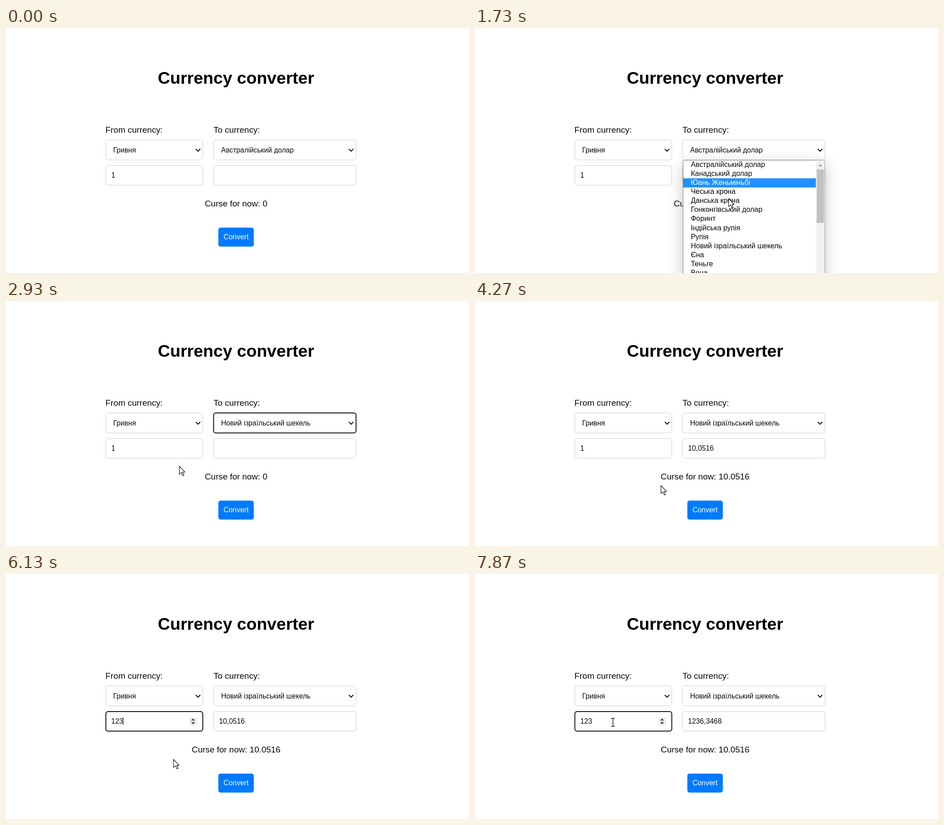
Animation of 1027 by 545 pixels, one loop 8000 ms. Source, as an HTML page:

```html
<!DOCTYPE html>
<html lang="en">
<head>
<meta charset="utf-8">
<title>Currency converter</title>
<style>
  html, body { margin: 0; width: 100%; height: 100%; overflow: hidden; background: #fff; }
  svg { display: block; font-family: "Liberation Sans", Arial, sans-serif; }
  text { white-space: pre; fill: #080808; }
  .label { font-size: 18.95px; }
  .choice { font-size: 15.65px; }
  .value { font-size: 15.8px; }
  .option { font-size: 16px; }
  .field { fill: #fff; stroke: #ccc; stroke-width: 1; }
  .field.focus { stroke: #101010; stroke-width: 2; }
  .chevron { fill: none; stroke: #111; stroke-width: 2; }
  #popup { filter: drop-shadow(0 10px 16px rgba(0, 0, 0, .22)); }
  .pointer { fill: #fff; stroke: #111; stroke-width: 1.2; stroke-linejoin: round; }
</style>
</head>
<body>
<svg id="stage" width="1027" height="545" viewBox="0 0 1027 545">
  <text x="510.2" y="123.8" text-anchor="middle" font-size="37.6" font-weight="700" style="fill:#000">Currency converter</text>
  <text class="label" x="220.5" y="232.6">From currency:</text>
  <text class="label" x="460.2" y="232.6">To currency:</text>

  <rect class="field" x="221.5" y="249" width="215" height="44.5" rx="5"/>
  <text class="choice" x="237.7" y="277">Гривня</text>
  <path class="chevron" d="M421 269l5 5 5-5"/>

  <rect class="field" id="target" x="460.5" y="249" width="316" height="44.5" rx="5"/>
  <text class="choice" id="choice" x="477.3" y="277"></text>
  <path class="chevron" d="M760.5 269l5 5 5-5"/>

  <rect class="field" id="amount" x="221.5" y="306" width="215" height="43.5" rx="5"/>
  <rect id="selection" x="233.5" y="318" width="8.8" height="19" fill="#3390ff"/>
  <text class="value" id="typed" x="233.5" y="332.5"></text>
  <rect id="caret" y="318" width="1" height="18" fill="#000"/>
  <g id="spinner">
    <rect x="406.5" y="318" width="17.5" height="19" fill="#efefef"/>
    <path d="M410.5 326h9l-4.5-5zM410.5 329.5h9l-4.5 5z" fill="#505050"/>
  </g>

  <rect class="field" x="460.5" y="306" width="316" height="43.5" rx="5"/>
  <text class="value" id="result" x="472.5" y="332.5"></text>

  <text class="label" id="rate" x="510.4" y="396.8" text-anchor="middle"></text>
  <rect id="button" x="471" y="444" width="78.7" height="42.2" rx="5"/>
  <text x="510.4" y="470" text-anchor="middle" font-size="15.95" style="fill:#fff">Convert</text>

  <g id="popup">
    <rect x="461.5" y="294" width="314.5" height="290" rx="2" fill="#fff" stroke="#777"/>
    <rect id="highlight" x="462" width="294.3" height="20.3" fill="#1e90ff"/>
    <g id="options"></g>
    <rect x="756.5" y="294.5" width="19" height="280" fill="#f1f1f1"/>
    <rect x="758" y="314.5" width="16" height="119" fill="#c1c1c1"/>
    <path d="M761.5 307.5h9l-4.5-5z" fill="#a3a3a3"/>
  </g>

  <g id="cursor">
    <path class="pointer" id="arrow" d="M.5 .5V18.4L4.8 14.6 8 21.6 10.8 20.4 7.8 13.6H13Z"/>
    <g id="hand">
      <path class="pointer" d="M-2.2 15V.5Q-2-1.5 0-1.5T2 .5V8.5Q4.5 7.5 5 9.5 7.5 8.7 7.8 10.7 10 10.3 10 12.5V18Q9.5 21 8 23V25.5H-2.5V23Q-6 19.5-8.5 14-9 11.5-6.5 12-4 13-2.2 15Z"/>
      <path d="M2 9v4M5 10v3.500M7.800 11v3" stroke="#111"/>
    </g>
    <path id="beam" d="M-4-9h2.500Q0-9 0-7.500 0-9 1.500-9H4M0-7.500V7.500M-4 9h2.500Q0 9 0 7.500 0 9 1.500 9H4" fill="none" stroke="#111" stroke-width="1.4"/>
  </g>
</svg>
<script>
const LOOP = 8000, TICK = 1000 / 15;
const ROW_TOP = 294.2, ROW_HEIGHT = 20.1;
const DIGIT = 15.8 * 0.556;
const $ = id => document.getElementById(id);

const currencies = ['Австралійський долар', 'Канадський долар', 'Юань Женьміньбі', 'Чеська крона',
  'Данська крона', 'Гонконгівський долар', 'Форинт', 'Індійська рупія', 'Рупія',
  'Новий ізраїльський шекель', 'Єна', 'Теньге', 'Вона'];

currencies.forEach((name, i) => {
  const text = document.createElementNS('http://www.w3.org/2000/svg', 'text');
  text.setAttribute('class', 'option');
  text.setAttribute('x', 478.7);
  text.setAttribute('y', ROW_TOP + ROW_HEIGHT * i + 14.6);
  text.textContent = name;
  $('options').append(text);
});

// time, x, y of the pointer's hot spot
const path = [
  [600, 712, 477], [1400, 572, 273], [1467, 572, 273], [1733, 562, 379], [2067, 570, 487],
  [2533, 570, 487], [2933, 384, 367], [3400, 516, 474], [4133, 516, 474], [4267, 412, 410],
  [4533, 323, 363], [4600, 323, 363], [4867, 246, 330], [5067, 165, 330], [5333, 289, 379],
  [5467, 290, 379], [5933, 290, 379], [6400, 508, 463], [6467, 512, 462], [6800, 512, 462],
  [7333, 306, 330], [8000, 306, 330]
];

// Value tables: the last entry whose time has passed applies.
const choice = [[0, currencies[0]], [2600, currencies[9]]];
const typed = [[0, '1'], [5733, '12'], [5867, '123']];
const result = [[0, ''], [3667, '10,0516'], [6667, '1236,3468']];
const rate = [[0, '0'], [3667, '10.0516']];

const at = (steps, t) => steps.filter(s => s[0] <= t + 2).pop()[1];
const during = (t, from, to) => t + 2 >= from && t + 2 < to;
const show = (id, on) => { $(id).style.display = on ? '' : 'none'; };
const inside = ([x, y], left, top, right, bottom) => x >= left && x <= right && y >= top && y <= bottom;

// Monotone cubic: smooth through points, still at turns and rests.
function slope(i, axis) {
  if (i === 0 || i === path.length - 1) return 0;
  const rise = k => (path[k + 1][axis] - path[k][axis]) / (path[k + 1][0] - path[k][0]);
  const a = rise(i - 1), b = rise(i);
  return a * b <= 0 ? 0 : 2 * a * b / (a + b);
}

function position(t) {
  t = Math.min(Math.max(t, path[0][0]), LOOP);
  let i = 0;
  while (i < path.length - 2 && path[i + 1][0] <= t) i++;
  const span = path[i + 1][0] - path[i][0], u = (t - path[i][0]) / span, v = 1 - u;
  return [1, 2].map(axis =>
    path[i][axis] * (1 + 2 * u) * v * v + path[i + 1][axis] * u * u * (3 - 2 * u) +
    span * u * v * (slope(i, axis) * v - slope(i + 1, axis) * u));
}

function pointerKind(t, pos, open) {
  if (open) return 'arrow';
  if (during(t, 4867, 5133)) return 'beam';
  if (inside(pos, 471, 444, 550, 486)) return 'hand';
  if (inside(pos, 221, 306, 437, 350) || inside(pos, 460, 306, 777, 350)) return 'beam';
  return 'arrow';
}

function draw(now) {
  const t = Math.floor((now % LOOP + 5) / TICK) * TICK;
  const pos = position(t), open = during(t, 1467, 2600);
  const kind = pointerKind(t, pos, open);
  const editing = during(t, 4867, 6400) || during(t, 7333, LOOP);
  const selected = during(t, 5000, 5600);

  $('choice').textContent = at(choice, t);
  $('typed').textContent = at(typed, t);
  $('result').textContent = at(result, t);
  $('rate').textContent = 'Curse for now: ' + at(rate, t);

  $('target').classList.toggle('focus', during(t, 2600, 3467));
  $('amount').classList.toggle('focus', editing);
  show('spinner', editing || inside(pos, 221, 306, 437, 350) && t > 600);
  show('selection', selected);
  $('typed').style.fill = selected ? '#fff' : '';
  show('caret', during(t, 4867, 5000) || during(t, 5600, 6400) || during(t, 7333, 7867));
  $('caret').setAttribute('x', 233.2 + DIGIT * at(typed, t).length);

  show('popup', open);
  const row = Math.max(0, Math.floor((position(t - TICK)[1] - ROW_TOP) / ROW_HEIGHT));
  $('highlight').setAttribute('y', ROW_TOP + ROW_HEIGHT * row);
  [...$('options').children].forEach((el, i) => { el.style.fill = i === row ? '#fff' : ''; });

  $('button').setAttribute('fill', kind === 'hand' ? '#0062cc' : '#007bff');
  show('cursor', t + 2 >= 600);
  for (const id of ['arrow', 'hand', 'beam']) show(id, id === kind);
  $('cursor').setAttribute('transform', `translate(${pos.map(Math.round)})`);
}

const start = performance.now();
function frame() {
  draw(performance.now() - start);
  requestAnimationFrame(frame);
}
frame();
</script>
</body>
</html>
```
